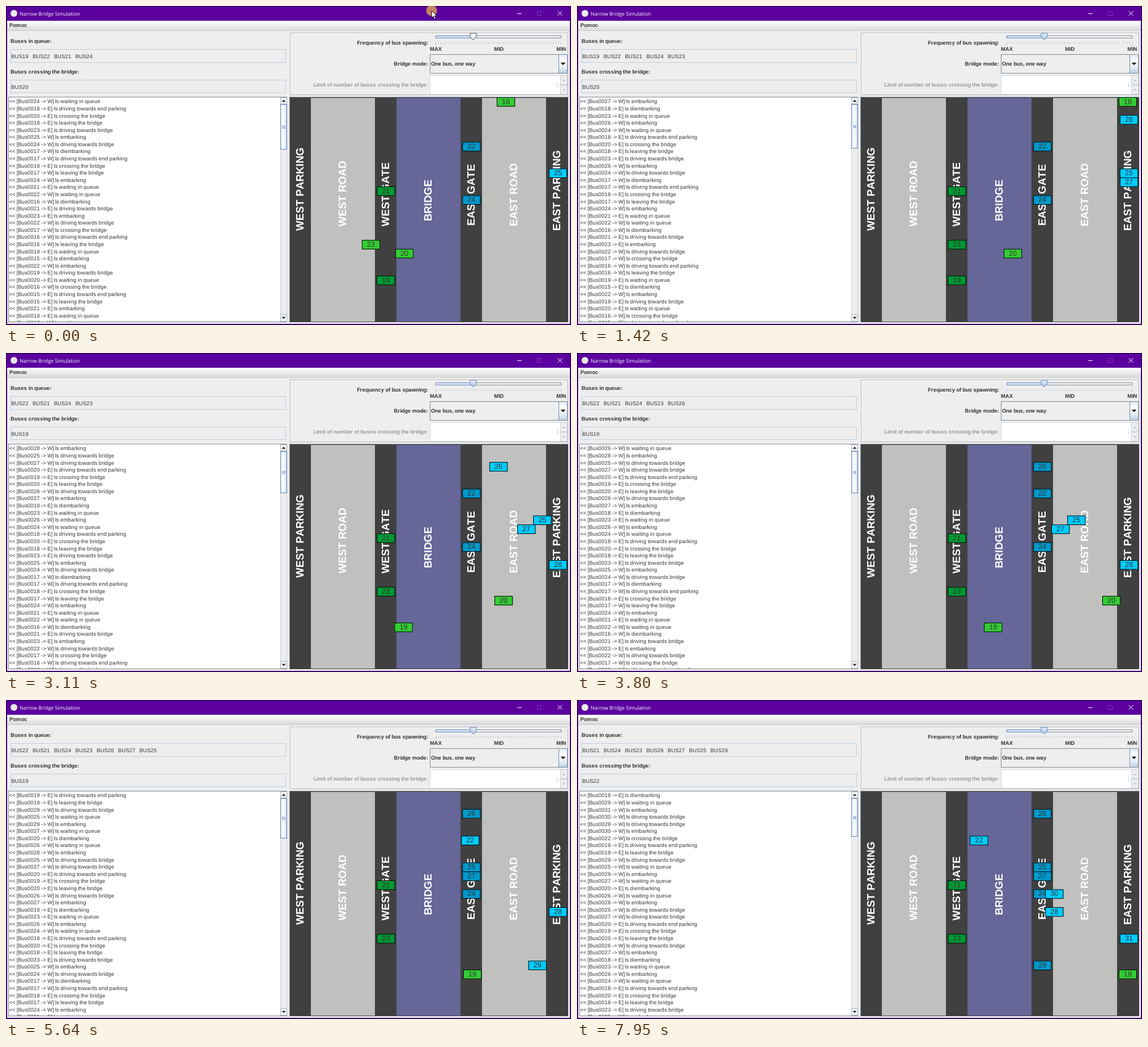
Recreate the animation shown at these times as an HTML page with a canvas. Size 997 by 562 pixels, loop 8 s.

```html
<!DOCTYPE html>
<html lang="en">
<head>
<meta charset="utf-8">
<title>Narrow Bridge Simulation</title>
<style>
html, body { margin: 0; width: 100%; height: 100%; overflow: hidden; background: #16002a; }
canvas { display: block; width: 997px; height: 562px; }
</style>
</head>
<body>
<canvas id="stage" width="997" height="562"></canvas>
<script>
const ctx = document.getElementById('stage').getContext('2d');
const LOOP = 8000, TICK = 76.95, LEAD = 19;
const SCALE = 0.786; // the window is shown reduced
const SANS = '"Liberation Sans", Arial, sans-serif';
const INK = '#333333', EDGE = '#7a8a99', PALE = '#b8cfe5', PANEL = '#eeeeee', PURPLE = '#5b009f';

const ACTIONS = {
  e: 'embarking', d: 'driving towards bridge', q: 'waiting in queue', c: 'crossing the bridge',
  l: 'leaving the bridge', p: 'driving towards end parking', x: 'diembarking'
};

// Entries are bus number, direction and action; newest first.
const HISTORY = ('24Wq 18Ep 20Ec 18El 23Ed 25We 24Wd 17Wx 17Wp 18Ec 17Wl 24We 21Eq 22Wq 16Wx 21Ed ' +
  '23Ee 22Wd 17Wc 16Wp 16Wl 19Eq 15Ex 22We 19Ed 20Eq 16Wc 15Ep 15El 21Ee 18Eq 17Wq').split(' ');

// tick:entry, oldest first
const EVENTS = ('2:26We 4:23Eq 13:18Ex 15:27We 26:26Wd 32:20El 33:19Ec 33:20Ep 33:27Wd 37:25Wd 40:28We ' +
  '47:26Wq 54:20Ex 54:27Wq 56:29We 58:25Wq 68:29Wd 73:19El 73:19Ep 74:22Wc 78:30We 85:28Wd 85:30Wd ' +
  '87:31We 90:29Wq 94:19Ex').split(' ').map(s => s.split(':'));

const WEST_GATE = 654.3, EAST_GATE = 805.2, EAST_PARK = 957.9, EAST_END = 955.8;

// Drives from the east parking to the east gate.
const westbound = (spawn, start) => [[spawn, EAST_PARK], [start, EAST_PARK], [start + 21.1, EAST_GATE]];

const BUSES = [
  { id: 18, row: 0, dir: 'E', path: [[0, 866], [12.4, EAST_END]], end: 25 },
  { id: 19, row: 20, dir: 'E', path: [[0, WEST_GATE], [31.45, WEST_GATE], [72.6, 804], [93.6, EAST_END]] },
  { id: 20, row: 17, dir: 'E', path: [[0, 687], [32, 804.3], [53, EAST_END]], end: 66 },
  { id: 21, row: 10, dir: 'E', path: [[0, WEST_GATE]] },
  { id: 22, row: 5, dir: 'W', path: [[0, EAST_GATE], [72.4, EAST_GATE], [103, 693.3]] },
  { id: 23, row: 16, dir: 'E', path: [[0, 628], [3.6, WEST_GATE]] },
  { id: 24, row: 11, dir: 'W', path: [[0, EAST_GATE]] },
  { id: 25, row: 8, dir: 'W', path: westbound(0, 36.2) },
  { id: 26, row: 2, dir: 'W', path: westbound(2, 25.5) },
  { id: 27, row: 9, dir: 'W', path: westbound(15, 32.3) },
  { id: 28, row: 13, dir: 'W', path: westbound(40, 84.8) },
  { id: 29, row: 19, dir: 'W', path: westbound(56, 68) },
  { id: 30, row: 11, dir: 'W', path: westbound(78, 84.8) },
  { id: 31, row: 16, dir: 'W', path: westbound(87, 120) }
];

const ZONES = [
  ['WEST PARKING', 396], ['WEST ROAD', 388.5], ['WEST GATE', 388.5], ['BRIDGE', 379],
  ['EAST GATE', 387], ['EAST ROAD', 388], ['EAST PARKING', 396]
];
const ZONE_EDGES = [501, 538, 651, 689, 802, 840, 953, 991];

const CURSOR_X = [[0, 751], [2, 757], [9, 800], [12, 806], [15, 824]];
const CURSOR_Y = [[0, 8], [2, 13], [9, 25], [12, 28], [15, 53]];
const CURSOR_GONE = 15;

function along(points, n) {
  const i = points.findIndex(p => p[0] > n);
  if (i < 0) return points[points.length - 1][1];
  if (i === 0) return points[0][1];
  const [n0, v0] = points[i - 1], [n1, v1] = points[i];
  return v0 + (v1 - v0) * (n - n0) / (n1 - n0);
}

function fill(x, y, w, h, color) {
  ctx.fillStyle = color;
  ctx.fillRect(x, y, w, h);
}

function box(x, y, w, h, color, edge, line = 1) {
  fill(x, y, w, h, color);
  ctx.strokeStyle = edge;
  ctx.lineWidth = line;
  ctx.strokeRect(x + line / 2, y + line / 2, w - line, h - line);
}

// Unkerned text whose letters advance by whole unscaled pixels.
// align: 0 left, 0.5 centre, 1 right
function text(str, x, y, { size = 12, bold = false, color = INK, align = 0 } = {}) {
  ctx.font = `${bold ? 'bold ' : ''}${size}px ${SANS}`;
  ctx.fillStyle = color;
  const letters = [...str];
  const steps = letters.map(c => Math.round(ctx.measureText(c).width));
  ctx.save();
  ctx.translate(x, y);
  ctx.scale(SCALE, SCALE);
  let pen = -align * steps.reduce((a, b) => a + b, 0);
  letters.forEach((c, i) => {
    ctx.fillText(c, pen, 0);
    pen += steps[i];
  });
  ctx.restore();
}

function label(str, x, y, align = 0, color = INK) {
  text(str, x, y, { bold: true, align, color });
}

function poly(points, color, edge) {
  ctx.beginPath();
  points.forEach(([x, y]) => ctx.lineTo(x, y));
  ctx.closePath();
  ctx.fillStyle = color;
  ctx.fill();
  if (!edge) return;
  ctx.strokeStyle = edge;
  ctx.lineWidth = 1;
  ctx.stroke();
}

function line(x0, y0, x1, y1, color, width = 1) {
  ctx.beginPath();
  ctx.moveTo(x0, y0);
  ctx.lineTo(x1, y1);
  ctx.strokeStyle = color;
  ctx.lineWidth = width;
  ctx.stroke();
}

function blend(x0, y0, x1, y1, ...colors) {
  const g = ctx.createLinearGradient(x0, y0, x1, y1);
  colors.forEach((c, i) => g.addColorStop(i / (colors.length - 1), c));
  return g;
}

// dir is -1 for up, 1 for down
function arrow(x, y, r, dir, color) {
  poly([[x - r, y - dir * r / 2], [x + r, y - dir * r / 2], [x, y + dir * r / 2]], color);
}

function drawWindow() {
  fill(0, 0, 997, 562, '#16002a');
  fill(1, 1, 995, 560, PURPLE);
  fill(2, 26, 993, 534, PANEL);

  ctx.beginPath();
  ctx.arc(14, 13, 6, 0, Math.PI * 2);
  ctx.fillStyle = '#e8e8e8';
  ctx.fill();
  ctx.font = '8.9px "Open Sans", "Noto Sans", sans-serif';
  ctx.fillStyle = '#ffffff';
  ctx.fillText('Narrow Bridge Simulation', 24, 16.5);
  line(902, 13.5, 910, 13.5, '#ffffff');
  ctx.strokeStyle = '#7c3ab0';
  ctx.strokeRect(937.5, 9.5, 7, 7);
  line(973.5, 9, 981.5, 17, '#ffffff');
  line(981.5, 9, 973.5, 17, '#ffffff');

  fill(2, 26, 993, 17, blend(0, 26, 0, 43, '#ffffff', '#dadada'));
  line(2, 43.5, 995, 43.5, '#cccccc');
  label('Pomoc', 6, 37);
}

function drawStatus(queue, crossing) {
  label('Buses in queue:', 8, 65);
  box(8, 76, 486, 24, PANEL, PALE);
  text(queue.map(b => 'BUS' + b).join('   '), 9.2, 92);
  label('Buses crossing the bridge:', 8, 118.5);
  box(8, 130, 486, 23, PANEL, PALE);
  text('BUS' + crossing, 9.2, 145.5);
}

function drawSlider(n) {
  box(758, 52, 222, 5, '#f4f4f4', EDGE);
  box(758, 52, 66, 5, '#dce8f5', '#6382bf');
  for (let i = 0; i <= 50; i++) {
    const x = 758.5 + i * 4.42;
    line(x, 63.5, x, i % 25 ? 66.5 : 69, '#a9b7c6', 0.8);
  }
  label('MAX', 758.5, 79, 0.5);
  label('MID', 870, 79, 0.5);
  label('MIN', 980, 79, 0.5);
  const lit = n >= 12;
  poly([[819, 48], [830, 48], [830, 54.5], [824.5, 60], [819, 54.5]],
    lit ? blend(0, 48, 0, 60, '#e8f1fa', '#a3c1e0') : blend(0, 48, 0, 60, '#ffffff', '#dddddd'),
    lit ? '#6382bf' : '#4a5560');
}

function drawControls(n) {
  ctx.strokeStyle = '#b5b5b5';
  ctx.lineWidth = 1;
  ctx.strokeRect(501.5, 47.5, 490, 109);
  line(502, 48.5, 991, 48.5, '#ffffff');
  line(502.5, 48, 502.5, 156, '#ffffff');

  label('Frequency of bus spawning:', 745, 68, 1);
  drawSlider(n);

  label('Bridge mode:', 745, 105, 1);
  box(748, 85, 243, 34, PANEL, EDGE);
  box(975, 85, 16, 34, blend(0, 85, 0, 119, '#dde8f3', '#ffffff', '#e6eef6', PALE), EDGE);
  arrow(983, 102, 4.5, 1, '#222222');
  label('One bus, one way', 750, 105);

  label('Limit of number of buses crossing the bridge:', 745, 142, 1, '#999999');
  box(748, 122, 243, 34, '#ffffff', '#d4dde6');
  box(978, 122, 13, 17, PANEL, '#c4cfda');
  box(978, 139, 13, 17, PANEL, '#c4cfda');
  arrow(984.5, 131, 2.5, -1, '#9fb2c6');
  arrow(984.5, 148, 2.5, 1, '#9fb2c6');
  text('1', 976, 142, { color: PALE, align: 1 });
}

function drawLog(log, added) {
  box(4, 160, 492, 397, '#ffffff', EDGE);
  ctx.save();
  ctx.beginPath();
  ctx.rect(5, 161, 479, 395);
  ctx.clip();
  log.slice(0, 32).forEach((entry, i) => {
    const message = `<< [Bus00${entry.slice(0, 2)} -> ${entry[2]}] Is ${ACTIONS[entry[3]]}`;
    text(message, 5.5, 171.4 + i * 12.58);
  });
  ctx.restore();

  box(484, 161, 12, 395, PANEL, '#c5d0db');
  box(484, 161, 12, 12, '#f3f3f3', '#a6b3c0');
  box(484, 543, 12, 13, '#f3f3f3', '#a6b3c0');
  arrow(490, 167, 3.5, -1, '#222222');
  arrow(490, 549.5, 3.5, 1, '#222222');
  const size = 370 * 31.4 / (145 + added);
  box(484, 173, 12, Math.round(size), blend(484, 0, 496, 0, '#dde8f3', '#ffffff', PALE), '#6382bf');
  const mid = Math.round(173 + size / 2);
  for (let k = -2; k <= 2; k += 2) line(487, mid + k + 0.5, 493, mid + k + 0.5, '#6382bf', 0.8);
}

function drawBus(bus, n) {
  if (n < bus.path[0][0] || n >= (bus.end || Infinity)) return;
  const x = along(bus.path, n), y = 160.7 + bus.row * 20 * SCALE;
  const waiting = x === WEST_GATE || x === EAST_GATE;
  const color = bus.dir === 'E' ? (waiting ? '#009933' : '#33cc33') : (waiting ? '#0099cc' : '#00ccff');
  box(x, y, 41 * SCALE, 21 * SCALE, color, '#000000', 1);
  text(String(bus.id), x + 16.1, y + 11.8, { size: 16, align: 0.5 });
}

function drawMap(n) {
  ctx.save();
  ctx.beginPath();
  ctx.rect(500, 161, 492, 396);
  ctx.clip();
  fill(500, 161, 492, 396, '#404040');
  ZONES.forEach(([name, bottom], i) => {
    const x = ZONE_EDGES[i];
    fill(x, 162, ZONE_EDGES[i + 1] - x, 394, i === 3 ? '#666699' : i % 2 ? '#c0c0be' : '#404040');
    ctx.save();
    ctx.translate(524.8 + i * 75.5, bottom);
    ctx.rotate(-Math.PI / 2);
    text(name, 0, 0, { size: 24, bold: true, color: '#ffffff' });
    ctx.restore();
  });
  BUSES.forEach(bus => drawBus(bus, n));
  ctx.restore();
  line(500, 160.5, 992, 160.5, EDGE);
  line(500.5, 160, 500.5, 557, EDGE);
}

function drawCursor(n) {
  if (n >= CURSOR_GONE) return;
  const x = along(CURSOR_X, n), y = along(CURSOR_Y, n);
  ctx.beginPath();
  ctx.arc(x, y, 9.5, 0, Math.PI * 2);
  ctx.fillStyle = 'rgba(218, 155, 90, 0.85)';
  ctx.fill();
  const tip = [[0, 0], [0, 13], [3, 10.2], [5.2, 15], [7.4, 14], [5.2, 9.4], [9.2, 9.2]];
  poly(tip.map(([dx, dy]) => [x + dx, y + dy]), '#ffffff', '#000000');
}

function stateAt(n) {
  const log = HISTORY.slice();
  let queue = ['19', '22', '21', '24'], crossing = '20', added = 0;
  for (const [tick, entry] of EVENTS) {
    if (+tick > n) break;
    const id = entry.slice(0, 2);
    log.unshift(entry);
    added++;
    if (entry[3] === 'q') queue.push(id);
    if (entry[3] === 'c') {
      queue = queue.filter(b => b !== id);
      crossing = id;
    }
  }
  return { log, queue, crossing, added };
}

function draw(n) {
  const { log, queue, crossing, added } = stateAt(n);
  drawWindow();
  drawStatus(queue, crossing);
  drawControls(n);
  drawLog(log, added);
  drawMap(n);
  drawCursor(n);
}

ctx.textRendering = 'geometricPrecision';
const begin = performance.now();
let shown = -1;
function frame() {
  const time = (performance.now() - begin) % LOOP;
  const n = Math.max(0, Math.floor((time - LEAD) / TICK));
  if (n !== shown) draw(n);
  shown = n;
  requestAnimationFrame(frame);
}
frame();
</script>
</body>
</html>
```
